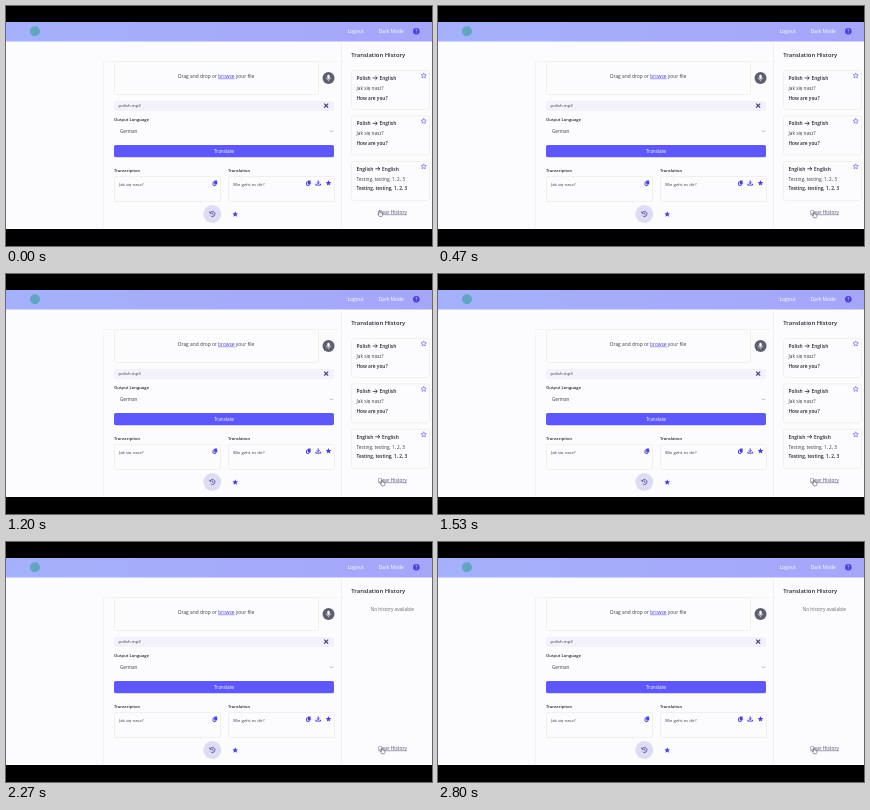
These frames come from a looping animation (426 px wide and 240 px high, 2.87 s). An HTML page with a canvas:

```html
<!DOCTYPE html>
<html lang="en">
<head>
<meta charset="utf-8">
<title>Audio translator</title>
<style>
html, body { margin: 0; width: 100%; height: 100%; overflow: hidden; background: #000; }
canvas { display: block; width: 426px; height: 240px; }
</style>
</head>
<body>
<canvas id="stage"></canvas>
<script>
const LOOP = 2870, CLEARED = 1670;
const INK = '#3c3c4a', DARK = '#262635', BLUE = '#4a42de', LINE = '#f1f0ea';
const canvas = document.getElementById('stage');
const ctx = canvas.getContext('2d');
const ratio = window.devicePixelRatio || 1;
canvas.width = 426 * ratio;
canvas.height = 240 * ratio;

function text(str, x, y, size, color = INK, weight = 400, align = 'left') {
  ctx.font = `${weight} ${size}px "Open Sans", "Noto Sans", sans-serif`;
  ctx.textAlign = align;
  ctx.fillStyle = color;
  ctx.fillText(str, x, y);
  return ctx.measureText(str).width;
}

function rect(x, y, w, h, color) {
  ctx.fillStyle = color;
  ctx.fillRect(x, y, w, h);
}

function box(x, y, w, h, r, fill, stroke) {
  ctx.beginPath();
  ctx.roundRect(x, y, w, h, r);
  if (fill) { ctx.fillStyle = fill; ctx.fill(); }
  if (stroke) { ctx.strokeStyle = stroke; ctx.lineWidth = 1; ctx.stroke(); }
}

function disc(x, y, r, color) {
  ctx.fillStyle = color;
  ctx.beginPath();
  ctx.arc(x, y, r, 0, Math.PI * 2);
  ctx.fill();
}

function path(points, color, width = 0.8) {
  ctx.beginPath();
  points.forEach(([x, y], i) => i ? ctx.lineTo(x, y) : ctx.moveTo(x, y));
  ctx.strokeStyle = color;
  ctx.lineWidth = width;
  ctx.stroke();
}

function star(x, y, r, filled) {
  ctx.beginPath();
  for (let i = 0; i < 10; i++) {
    const a = i * Math.PI / 5 - Math.PI / 2, d = i % 2 ? r * 0.46 : r;
    ctx.lineTo(x + d * Math.cos(a), y + d * Math.sin(a));
  }
  ctx.closePath();
  if (filled) { ctx.fillStyle = BLUE; ctx.fill(); }
  else { ctx.strokeStyle = '#6f69ec'; ctx.lineWidth = 0.7; ctx.stroke(); }
}

function copyIcon(x, y) {
  box(x - 2, y - 1, 2.8, 3.4, 0.5, null, BLUE);
  box(x - 0.7, y - 2.5, 2.9, 3.7, 0.5, BLUE);
}

function downloadIcon(x, y) {
  path([[x, y - 2.6], [x, y + 0.6]], BLUE, 1.1);
  path([[x - 1.4, y - 0.5], [x, y + 0.9], [x + 1.4, y - 0.5]], BLUE, 0.9);
  path([[x - 2.4, y + 0.8], [x - 2.4, y + 2.1], [x + 2.4, y + 2.1], [x + 2.4, y + 0.8]], BLUE, 1);
}

function underline(x, y, w, color) {
  rect(x, y, w, 0.5, color);
}

function header() {
  const g = ctx.createLinearGradient(0, 0, 426, 0);
  g.addColorStop(0, '#a5b1fa');
  g.addColorStop(1, '#a5a6fa');
  rect(0, 16, 426, 19.5, g);
  disc(29, 25.3, 5, '#62a5c0');
  text('Logout', 341.5, 27.2, 4.9, '#fff');
  text('Dark Mode', 372.5, 27.2, 4.9, '#fff');
  disc(410.3, 25.3, 3.3, BLUE);
  text('?', 410.3, 27, 4.6, '#b6b5fa', 700, 'center');
}

function dropZone() {
  path([[97.5, 222], [97.5, 55.5], [335.5, 55.5]], '#f5f4ef', 1);
  path([[335.5, 35.5], [335.5, 222]], LINE, 1);
  box(108.5, 55.5, 204, 33, 1, null, LINE);
  let x = 172;
  x += text('Drag and drop or ', x, 71.6, 4.85);
  const w = text('browse', x, 71.6, 4.85, BLUE);
  underline(x, 72.6, w, BLUE);
  text(' your file', x + w, 71.6, 4.85);
  disc(322.5, 72, 6, '#5f5f72');
  box(321.3, 68.7, 2.4, 4.2, 1.2, '#fff');
  ctx.beginPath();
  ctx.arc(322.5, 71.6, 2.2, 0, Math.PI);
  ctx.strokeStyle = '#d9d9e4';
  ctx.lineWidth = 0.6;
  ctx.stroke();
  path([[322.5, 73.8], [322.5, 75.3]], '#d9d9e4', 0.7);
}

function form() {
  box(108, 95, 220, 10, 2, '#f3f1fa');
  text('polish.mp3', 112.5, 101.3, 4.3);
  path([[318.2, 97.6], [322.2, 101.6]], '#35307f', 1.1);
  path([[322.2, 97.6], [318.2, 101.6]], '#35307f', 1.1);
  text('Output Language', 108, 115, 4.2, DARK, 600);
  text('German', 114, 127.1, 4.6);
  path([[323.8, 124.6], [325.3, 126.1], [326.8, 124.6]], '#77778a', 0.6);
  box(108, 139, 220, 12.3, 1.8, '#5e57f9');
  text('Translate', 218, 146.9, 4.7, '#fff', 400, 'center');
  result('Transcription', 'Jak się nasz?', 108, 106);
  result('Translation', 'Wie geht es dir?', 222, 106);
  copyIcon(209, 177);
  copyIcon(302.5, 177);
  downloadIcon(312.2, 177);
  star(322.5, 177, 3, true);
  disc(206.3, 208, 9, '#dcdcf4');
  historyIcon(206.5, 208);
  star(229.2, 208.3, 3, true);
}

function result(title, body, x, w) {
  text(title, x, 166, 4.1, DARK, 600);
  box(x + 0.5, 170.5, w, 25, 1.5, null, LINE);
  text(body, x + 5, 180.4, 4.3);
}

function historyIcon(x, y) {
  ctx.beginPath();
  ctx.arc(x, y, 2.5, Math.PI * 1.12, Math.PI * 2.75);
  ctx.strokeStyle = '#4c4799';
  ctx.lineWidth = 0.8;
  ctx.stroke();
  path([[x - 3, y - 2.3], [x - 2.5, y - 0.6], [x - 0.9, y - 0.9]], '#4c4799');
  path([[x, y - 1.3], [x, y + 0.2], [x + 1.2, y + 0.9]], '#4c4799', 0.7);
}

function card(y, from, said, answer) {
  box(345.5, y + 0.5, 78, 39, 2, '#fcfcfe', LINE);
  const w = text(from, 350.5, y + 9.8, 4.9, DARK, 600);
  const x = 350.5 + w + 2, m = y + 8;
  path([[x, m], [x + 4.5, m]], DARK);
  path([[x + 2.7, m - 1.8], [x + 4.6, m], [x + 2.7, m + 1.8]], DARK);
  text('English', x + 6.8, y + 9.8, 4.9, DARK, 600);
  text(said, 350.5, y + 19.8, 4.75);
  text(answer, 350.5, y + 29.6, 4.8, DARK, 600);
  star(417.7, y + 5.7, 2.8, false);
}

function sidebar(t) {
  text('Translation History', 345.3, 51.2, 5.9, DARK, 600);
  if (t < CLEARED) {
    ctx.save();
    ctx.beginPath();
    ctx.rect(336, 55, 90, 140);
    ctx.clip();
    card(64, 'Polish', 'Jak się nasz?', 'How are you?');
    card(109.4, 'Polish', 'Jak się nasz?', 'How are you?');
    card(154.8, 'English', 'Testing, testing, 1, 2, 3', 'Testing, testing, 1, 2, 3');
    ctx.restore();
  } else {
    text('No history available', 386.3, 69, 4.7, '#666676', 400, 'center');
  }
  const w = text('Clear History', 372, 207.6, 4.8, '#4d4a72');
  underline(372, 208.6, w, '#4d4a72');
}

function hand(t) {
  const p = Math.min(t / 200, 1), e = 1 - (1 - p) ** 3;
  ctx.save();
  ctx.translate(373.6 + 2.4 * e, 204.4 + 1.4 * e);
  ctx.beginPath();
  ctx.moveTo(-0.6, 0.5);
  ctx.quadraticCurveTo(0, -0.4, 0.6, 0.5);
  ctx.lineTo(0.6, 2.3);
  ctx.lineTo(3, 2.9);
  ctx.lineTo(2.9, 4.6);
  ctx.lineTo(2.2, 6);
  ctx.lineTo(-0.2, 6);
  ctx.lineTo(-1.8, 3.7);
  ctx.lineTo(-0.6, 3.8);
  ctx.closePath();
  ctx.fillStyle = '#fff';
  ctx.fill();
  ctx.strokeStyle = '#333345';
  ctx.lineWidth = 0.5;
  ctx.stroke();
  ctx.restore();
}

function draw(t) {
  ctx.setTransform(ratio, 0, 0, ratio, 0, 0);
  rect(0, 0, 426, 240, '#000');
  rect(0, 16, 426, 207, '#fcfcfe');
  header();
  dropZone();
  form();
  sidebar(t);
  hand(t);
}

const start = performance.now();
function tick() {
  draw((performance.now() - start) % LOOP);
  requestAnimationFrame(tick);
}
tick();
</script>
</body>
</html>
```
